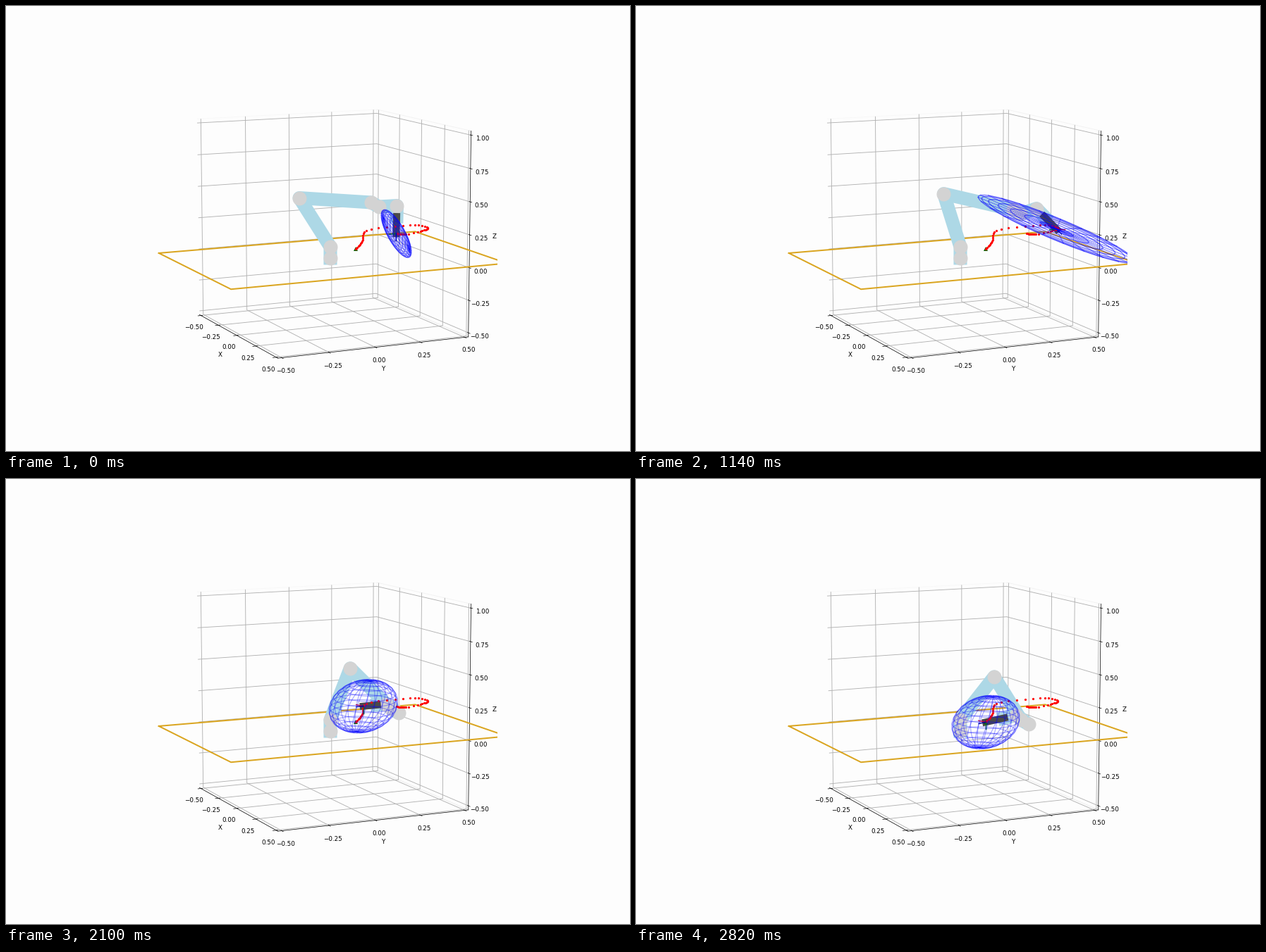
These frames come from a looping animation (885x632 px, 2.88 s). A matplotlib script:

```python
import numpy as np
import matplotlib.pyplot as plt
from matplotlib.animation import FuncAnimation
from matplotlib.collections import LineCollection

W, H, DPI = 885, 632, 63.2
FRAMES, HOLD = 48, 3
LAST = FRAMES - HOLD - 1
plt.rcParams["grid.linewidth"] = 1


def px(size):
    """Pixels to points."""
    return size * 72 / DPI


def ease(s, start, stop):
    u = np.clip((s - start) / (stop - start), 0, 1)
    return u * u * (3 - 2 * u)


def smooth(keys, s):
    """Monotone cubic through rows of (state, x, y), sampled at states s."""
    keys = np.array(keys, float)
    t, v = keys[:, 0], keys[:, 1:]
    h = np.diff(t)[:, None]
    d = np.diff(v, axis=0) / h
    same = d[:-1] * d[1:] > 0
    m = np.zeros_like(v)
    m[1:-1] = np.where(same, 2 * d[:-1] * d[1:] / np.where(same, d[:-1] + d[1:], 1), 0)
    m[0], m[-1] = d[0], d[-1]
    k = np.clip(np.searchsorted(t, s, side="right") - 1, 0, len(t) - 2)
    u = (s - t[k])[:, None] / h[k]
    return (v[k] * (1 + 2 * u) * (1 - u) ** 2 + v[k + 1] * u**2 * (3 - 2 * u)
            + h[k] * (m[k] * u * (1 - u) ** 2 - m[k + 1] * u**2 * (1 - u)))


# tool tip: out to the right, round the bend, back left and down to the goal
tip = smooth([(0, 553.5, 323.3), (8, 567, 324), (12, 588, 320), (18, 598, 315.3),
              (23, 580, 310.7), (31, 507.5, 320.5), (36, 505, 334),
              (44, 496, 345.3)], np.arange(LAST + 1))
BASE = np.array([(460, 358), (460, 342)])


def arm_joints(s):
    """Screen positions of base, shoulder, elbow and the three wrist joints."""
    swing = np.cos(np.pi * (s / LAST) ** 1.15)
    dx = 2 - 46 * swing
    lean = dx / (1.12 - .0027 * dx)
    elbow = BASE[1] + (dx, -np.sqrt(78**2 - lean**2))
    wrist = np.array([518 + 28 * ease(s, 2, 27), 279 + 63 * ((1 - swing) / 2) ** 1.2])
    side = wrist + (10.5, 6)
    roll = np.radians(5 + 126 * ease(s, 10, 32))
    hand = side + (26 * np.cos(roll), -16.5 * np.sin(roll))
    return np.vstack([BASE, elbow, wrist, side, hand])


# unit sphere wires
MERIDIANS, PARALLELS, STEPS = 23, 15, 41
half, full = np.linspace(0, np.pi, STEPS), np.linspace(0, 2 * np.pi, STEPS)
wires = [(np.full(STEPS, 2 * np.pi * i / MERIDIANS), half) for i in range(MERIDIANS)]
wires += [(full, np.full(STEPS, np.pi * i / PARALLELS)) for i in range(1, PARALLELS)]
az, po = np.array(wires).transpose(1, 0, 2)
sphere = np.stack([np.cos(az) * np.sin(po), np.sin(az) * np.sin(po), np.cos(po)], -1)


def ellipsoid(s):
    """Wires of a sphere that stretches mid-way, then turns upright and rounds out."""
    swell = 1 / (1 + ((s - 16.8) / 4.4) ** 4)
    turn, rounding = ease(s, 17, 23), ease(s, 24, 32)
    width = 21 + 27 * rounding + 91 * swell
    height = 34 + 4 * rounding + 15 * swell - 12 * np.exp(-((s - 22) / 3) ** 2)
    skew = .76 + .18 * ease(s, 0, 14) - 1.1 * turn
    x, y = .85 * (1 - ease(s, 0, 6)) + .2 * turn, -.92 * turn
    pole = np.array([x, y, np.sqrt(1 - x * x - y * y)])
    side = np.cross(pole, (1, .9, 0))
    side /= np.linalg.norm(side)
    disc = sphere @ np.array([side, np.cross(pole, side), pole])
    u, v = disc[..., 0], disc[..., 1]
    return tip[s] + np.stack([width * u, height * (skew * u + np.sqrt(1 - skew**2) * v)], -1)


fig = plt.figure(figsize=(W / DPI, H / DPI), dpi=DPI, facecolor="#fdfdfd")

# both axes share one square
size = .77 * H
left, bottom = .5125 * W - size / 2, .11 * H
rect = [left / W, bottom / H, size / W, size / H]

room = fig.add_axes(rect, projection="3d", facecolor="none")
room.view_init(elev=10, azim=-25)
room.set_box_aspect((1, 1, 1))
pad = 25 / 24
room.set(xlim=(-.5 * pad, .5 * pad), ylim=(-.5 * pad, .5 * pad),
         zlim=(.25 - .75 * pad, .25 + .75 * pad),
         xlabel="X", ylabel="Y", zlabel="Z",
         xticks=np.arange(-2, 3) / 4, yticks=np.arange(-2, 3) / 4,
         zticks=np.arange(-2, 5) / 4)
for axis in (room.xaxis, room.yaxis, room.zaxis):
    axis.pane.fill = False
room.plot([-.5, .5, .5, -.5, -.5], [-.75, -.75, .75, .75, -.75], [0] * 5,
          color="goldenrod", lw=px(2))

view = fig.add_axes(rect)
view.set_xlim(left, left + size)
view.set_ylim(H - bottom, H - bottom - size)
view.axis("off")

links, = view.plot([], [], color="lightblue", lw=px(19), solid_capstyle="projecting",
                   solid_joinstyle="round", zorder=1)
hubs, = view.plot([], [], "o", color="lightgray", ms=px(20), mew=0, zorder=2)
gripper, = view.plot([], [], color="#4a4a4a", lw=px(10),
                     solid_capstyle="projecting", zorder=3)
view.plot(*tip[-1], "^", color="darkgreen", ms=px(6.5), mew=0, zorder=4)
view.plot(*tip.T, "o", color="red", ms=px(3.2), mew=0, zorder=5)
arrows = [view.plot([], [], color=c, lw=px(1.4), zorder=6)[0]
          for c in ("red", "green", "navy")]
cage = LineCollection([], colors="blue", linewidths=px(1.2), alpha=.33, zorder=7)
view.add_collection(cage, autolim=False)


def update(frame):
    s = max(0, frame - HOLD)
    end, arm = tip[s], arm_joints(s)
    reach = end - arm[-1]
    flange = arm[-1] + .39 * reach
    links.set_data(*np.vstack([arm, flange]).T)
    hubs.set_data(*arm.T)
    gripper.set_data(*np.array([flange, end]).T)
    flip = ease(s, 16, 32)
    steps = [(12 - 22 * flip, 1 - 3 * flip), (-10 + 10 * flip, 1 + 9 * flip),
             10 * reach / np.linalg.norm(reach)]
    for line, step in zip(arrows, steps):
        line.set_data(*np.array([end, end + step]).T)
    cage.set_segments(ellipsoid(s))
    return links, hubs, gripper, *arrows, cage


anim = FuncAnimation(fig, update, frames=FRAMES, interval=60, repeat=True,
                     repeat_delay=0, blit=False)
plt.show()
```
